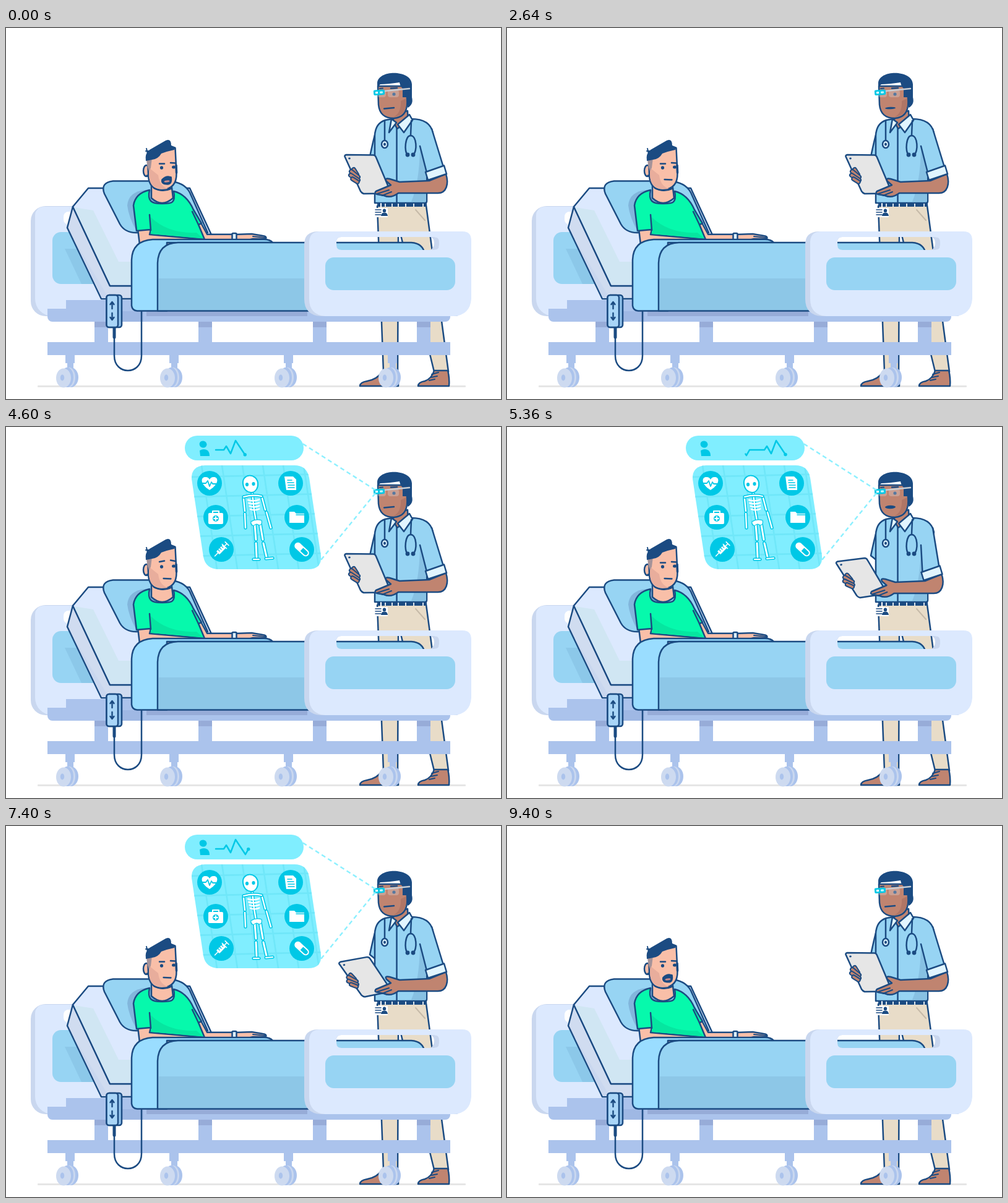
Write an HTML page with a canvas that moves like this. It is 800 px wide and 600 px high and loops after 9440 ms.

```html
<!DOCTYPE html>
<html lang="en">
<head>
<meta charset="utf-8">
<title>Bedside visit</title>
<style>
html, body { margin: 0; width: 100%; height: 100%; overflow: hidden; background: #fff; }
canvas { display: block; width: 800px; height: 600px; }
</style>
</head>
<body>
<canvas id="stage" width="800" height="600"></canvas>
<script>
const ctx = document.getElementById('stage').getContext('2d');
const LOOP = 9440, STEP = 40, TAU = Math.PI * 2;
const NAVY = '#1b4b82', BLUE = '#97d4f3', PALE = '#dce9fe', SHADE = '#c9d7ef', FRAME = '#abc3ec',
  FRAME_DARK = '#97acd8', SKIN = '#f9bfa8', SKIN_DARK = '#e8ad9c', BROWN = '#c08470', BEIGE = '#e8dcc8',
  GREEN = '#06f9ac', GREEN_DARK = '#06e6a0', AQUA = '#80eeff', CYAN = '#00c8e6';

const paths = new Map();
function shape(d, fill, stroke = NAVY, width = 2.5) {
  if (!paths.has(d)) paths.set(d, new Path2D(d));
  const p = paths.get(d);
  if (fill) { ctx.fillStyle = fill; ctx.fill(p, 'evenodd'); }
  if (stroke) { ctx.strokeStyle = stroke; ctx.lineWidth = width; ctx.stroke(p); }
}
const line = (d, width = 2.5, color = NAVY) => shape(d, null, color, width);
const flat = (d, fill) => shape(d, fill, null);
function box(x, y, w, h, r, fill, stroke) {
  ctx.beginPath();
  ctx.roundRect(x, y, w, h, r);
  paint(fill, stroke);
}
function oval(x, y, rx, ry, fill, stroke, angle = 0) {
  ctx.beginPath();
  ctx.ellipse(x, y, rx, ry, angle, 0, TAU);
  paint(fill, stroke);
}
function paint(fill, stroke) {
  if (fill) { ctx.fillStyle = fill; ctx.fill(); }
  if (stroke) { ctx.strokeStyle = stroke; ctx.lineWidth = 2.5; ctx.stroke(); }
}
function tube(d, width, fill, edge = NAVY, rim = 2.4) {
  line(d, width + rim * 2, edge);
  line(d, width, fill);
}
function group(draw) { ctx.save(); draw(); ctx.restore(); }
function turn(angle, x, y) { ctx.translate(x, y); ctx.rotate(angle); ctx.translate(-x, -y); }
function zoom(k, x, y) { ctx.translate(x, y); ctx.scale(k, k); ctx.translate(-x, -y); }

const lerp = (a, b, k) => a + (b - a) * k;
const clamp = k => Math.max(0, Math.min(1, k));
const ease = k => k * k * (3 - 2 * k);
// Eased value through time/value pairs
function key(t, ...k) {
  if (t <= k[0]) return k[1];
  for (let i = 2; i < k.length; i += 2)
    if (t < k[i]) return lerp(k[i - 1], k[i + 1], ease((t - k[i - 2]) / (k[i] - k[i - 2])));
  return k[k.length - 1];
}
const during = (t, a, b) => t >= a && t < b;

function headboard() {
  box(40, 288, 200, 178, 24, SHADE);
  box(47, 289, 200, 177, [14, 24, 24, 28], PALE);
  box(93, 297, 60, 21, 8, '#fff');
  box(75, 330, 120, 84, 14, BLUE);
  flat('M95 357 L116 357 L160 414 L122 414 Z', '#8cc8e9');
}

function doctorBody(t) {
  // legs and shoes
  shape('M600 288 L610 556 L633 556 L634 335 L638 335 L692 556 L715 556 L679 287 Z', BEIGE);
  shape('M572 579 Q572 573 584 571 Q600 568 607 557 L634 557 L634 579 Z', BROWN);
  shape('M666 579 Q666 573 677 571 Q688 567 692 554 L714 554 Q717 566 716 579 Z', BROWN);
  line('M688 560 L699 557 M687 565 L697 563 M684 570 L693 568', 2);
  line('M662 294 L677 311', 2, '#c6baa8');

  // far sleeve, neck and shirt
  shape('M600 160 Q596 170 588 208 L598 216 Z', BLUE);
  shape('M630 138 L649 134 L650 157 L633 166 L625 150 Z', BROWN);
  shape('M596 283 L596 174 Q597 154 613 149 L624 147 L632 163 L655 147 C676 147 687 155 690 170 L680 220 L680 280 Q680 283 677 283 Z', BLUE);
  flat('M669 195 L679 235 L679 281 L655 281 Q668 250 669 195 Z', '#87c1e3');
  line('M631.5 163 L631.5 283');
  shape('M623 147 L619 169 L631 153 Z', '#e1f5ff');
  shape('M633 156 L652 140 L657 149 L643 169 Z', '#e1f5ff');

  // stethoscope
  line('M612 150 L612 182');
  oval(612, 188, 5, 6, '#e1f5ff', NAVY);
  oval(612, 188, 2, 2.5, NAVY);
  line('M655 150 L654 173 M649 205 C643 200 645 174 654 174 C664 174 665 200 658 205');
  oval(649, 205, 3.4, 3.4, NAVY);
  oval(658, 205, 3.4, 3.4, NAVY);

  // belt and badge
  box(600, 283, 80, 6, 0, NAVY);
  for (const x of [612, 623, 633, 645, 658, 673]) box(x, 284, 2, 5, 0, '#dce5ec');
  box(596, 291, 21, 15, 1, '#fff');
  line('M597 294 H606 M597 298 H606 M597 302 H606', 1.6);
  oval(611.5, 295.5, 2.7, 3, NAVY);
  flat('M606 304 Q607 298 611.5 299 Q616 298 617 304 Z', NAVY);
  line('M606 284 L606 290', 2, '#fff');

  doctorHead(t);
}

function doctorHead(t) {
  flat('M648 96 L656 96 L656 112 Q659 124 649 129 Z', NAVY);
  shape('M601 94 L602 124 Q604 146 627 146 Q648 144 648 122 L648 94 Z', BROWN);
  flat('M638 118 L647 114 Q649 142 626 144 Q639 138 638 118 Z', '#b07666');
  flat('M600 96 V89 C601 67 655 67 656 91 V100 H648 V112 H641 V98 Q637 94 636 88 Q616 91 605 91 Z', NAVY);
  line('M622 97.5 L632 97', 2.5);
  line('M604 98 L609 97.5', 2);
  const blink = during(t, 2120, 2240) || during(t, 5480, 5600);
  oval(606, 106, 2.3, blink ? 0.7 : 2.3, NAVY);
  oval(627, 107, 2.6, blink ? 0.7 : 2.6, NAVY);
  box(617, 100, 18, 12, 4, 'rgba(225,225,230,.3)');
  box(600, 101, 14, 11, 4, 'rgba(225,225,230,.3)');
  line('M611 102 L652 98', 2.4, '#c9cdd3');
  group(() => {
    turn(-0.07, 603, 104);
    box(594, 100, 18, 8.5, 2, CYAN);
    box(597, 102.6, 4, 3.4, 1, '#fff');
    box(604, 102.6, 5, 3.4, 1, '#b8f6ff');
  });
  const talks = during(t, 2640, 3920) || during(t, 5000, 5960);
  const open = talks ? 0.5 + 0.5 * Math.cos((t - 3480) / 480 * TAU) : 0;
  if (open > 0.15) oval(619.5, 129.5, 8.5, 0.8 + 2 * open, NAVY, null, -0.04);
  else line('M611 130.5 L627 129', 2.4);
}

function doctorArm(t) {
  const lean = key(t, 2940, 0, 3280, 1, 3560, 1, 3880, 0, 5000, 0, 5320, 1, 5700, 1, 6040, 0);
  const tilt = key(t, 5100, 0, 5600, 15, 6200, 5.5, 6800, 11, 7400, 11, 8200, 0);
  const dx = -8.5 * lean, dy = 2 * lean;

  shape(`M688 163 L${707 + dx} ${225 + dy} L${680 + dx} ${233 + dy} L669 191 Z`, BLUE, null);
  line(`M688 163 L${707 + dx} ${225 + dy} M669 191 L${680 + dx} ${234 + dy}`);
  group(() => {
    ctx.translate(dx, dy);
    group(() => {
      turn(-tilt * Math.PI / 180, 622, 262);
      shape('M550 205 L594 205.5 Q597 206 598 209 L621 264 Q621 267 618 267.5 L578 268 Q575 267 573 264 L548 209 Q546 206 550 205 Z', '#e6e6e6');
      oval(555, 211, 1.8, 1.4, NAVY);
      tube('M562 229 L567 237', 4, BROWN, NAVY, 2);
      tube('M558 232 L569 241', 4, BROWN, NAVY, 2);
      tube('M557 238 L569 246', 4, BROWN, NAVY, 2);
      tube('M560 244 L568 249', 3.5, BROWN, NAVY, 2);
    });
    shape('M684 247 L636 249 L620 244 Q611 242 615 248 L622 254 L598 264 Q594 268 600 269 L611 271 Q622 276 634 267 L698 267 C712 267 716 252 711 236 Z', BROWN);
    line('M600 268 L619 262 M608 271 L623 265', 2);
    shape('M678 233 L708 222.5 L712 236 L682 246 Z', '#e1f5ff');
  });
}

function caster(x) {
  box(x + 15, 528, 15, 14, 0, FRAME);
  box(x + 18, 540, 10, 14, 0, FRAME);
  oval(x + 24, 565, 12, 16, FRAME);
  oval(x + 21, 565, 10, 16, SHADE);
  oval(x + 18, 565, 10, 16, FRAME);
  oval(x + 12, 566, 12, 15.5, '#cddaf0');
  oval(x + 10, 565.5, 3.2, 5, FRAME);
}

function bedFrame() {
  for (const x of [143, 311, 496, 664]) {
    box(x, 474, 22, 36, 0, FRAME);
    box(x, 474, 22, 10, 0, FRAME_DARK);
  }
  box(67, 454, 651, 21, [0, 0, 8, 8], FRAME);
  box(97, 440, 133, 20, 0, FRAME);
  box(176, 458, 46, 17, 0, '#9fb8e4');
  box(227, 457, 260, 9, 0, FRAME_DARK);
  box(67, 508, 651, 21, 0, FRAME);
  [81, 249, 434, 602].forEach(caster);
}

function mattress() {
  shape('M108 289 L99 323 L154 438 L230 438 L230 417 L168 417 Z', '#d0dcf0');
  flat('M100 322 L108 339 L166 437 L155 437 Z', SHADE);
  shape('M108 289 L133 259 L297 259 L335 341 L335 417 L168 417 Z', PALE);
  flat('M110 290 L141 295 L182 378 L204 378 L204 415 L169 415 Z', '#d0e6f3');
  shape('M173 247.5 L262 247.5 Q288 249 297 266 L326 331 L210 331 Q192 331 184 317 L159 268 Q152 250 173 247.5 Z', BLUE);
  flat('M211 329 Q198 305 196 287 Q198 264 226 262 L240 262 L240 329 Z', '#82b6dc');
}

function patientBody() {
  shape('M213 325 L216 350 L316 350 L312 330 Z', SKIN);
  shape('M235 250 L235 275 Q252 291 270 275 L267 250 Z', SKIN);
  shape('M232 262 Q209 267 206 287 L211 328 L234 326 L232 334 L321 342 L311 318 L316 316 L303 294 Q292 269 271 264 C275 285 266 284 251 284 C235 284 228 280 232 262 Z', GREEN);
  flat('M234 306 Q262 333 308 331 L318 340 L234 333 Z', GREEN_DARK);
  line('M232 302 L234 327 M301 297 L311 318');
}

function patientHead(t) {
  oval(227, 231, 5, 9, SKIN, NAVY);
  shape('M229 204 L230 240 Q232 262 252 262 Q276 260 275.5 235 L273.5 194 L262 190 Z', SKIN);
  flat('M231 226 L246 238 Q248 256 262 260 Q232 264 231 238 Z', SKIN_DARK);
  flat('M227 212 L236 210 L234 226 L231 232 L228 222 Z', '#a59399');
  flat('M226 215 Q224 203 232 197 L258 182 Q267 178 267 190 L274 193 L272 197 Q262 199 251 203 Q246 212 236 213 Z', NAVY);
  line('M227 195 L229 204 M226 199 L233 199', 2);
  line('M275 222 L275.5 234', 3.6);
  oval(228, 239, 1.8, 1.8, NAVY);
  line('M239 259 Q253 266 266 260', 2.5);

  const lift = key(t, 2960, 0, 3240, 1, 5000, 1, 5300, 0);
  const y = 219.5 - 2.5 * lift;
  line(`M248 ${y + lift} L256 ${y - lift * 0.6} M266 ${y - 1.5} L274 ${y - 1 + lift}`, 2.5);
  const blink = during(t, 640, 760) || during(t, 2400, 2520) || during(t, 5160, 5280);
  oval(251.5, 226, 2.6, blink ? 0.8 : 2.8, NAVY);
  oval(271, 225, 3, blink ? 0.8 : 2.5, NAVY);

  if (t < 2560 || t > 8840) {
    const talk = t > 8840 ? t - LOOP : t;
    const open = 0.5 + 0.5 * Math.cos(talk / 600 * TAU), low = 247 + 6 * open;
    shape(`M252 245 Q257 ${243 - 3 * open} 262 ${243 - 3 * open} L267 ${243 - 2 * open} Q269 ${low} 261 ${low} Q250 ${low} 252 245 Z`, NAVY, NAVY, 1.6);
    if (open > 0.55) oval(260, 248, 4.5, 1.6 * open, '#c98b8b', null, -0.1);
  } else line('M254.5 245 L266.5 245.5', 2.3);
}

function patientArm(t) {
  const up = key(t, 160, 0, 760, 1, 2040, 1, 2600, 0);
  const angle = -0.55 * up;
  const len = lerp(43, 53, up);
  const ex = 326, ey = lerp(341, 339, up);
  const wx = ex + len * Math.cos(angle), wy = ey + len * Math.sin(angle) - 2 * (1 - up);
  tube(`M304 306 L${ex - 4} ${ey - 2} L${wx} ${wy}`, lerp(8, 13, up), SKIN);
  group(() => {
    ctx.translate(wx, wy);
    if (up > 0.35) {
      ctx.rotate(angle + 0.55 + 0.14 * up * Math.sin((t - 1400) / 360 * Math.PI));
      tube('M18 -20 L29 -38', 4.5, SKIN, NAVY, 2.2);
      tube('M20 -18 L38 -36', 4.5, SKIN, NAVY, 2.2);
      tube('M22 -14 L39 -28', 4.5, SKIN, NAVY, 2.2);
      tube('M20 -10 L38 -20', 4.5, SKIN, NAVY, 2.2);
      shape('M-1 -12 Q2 -18 1 -27 Q5 -35 9 -26 L11 -19 L18 -25 L29 -17 Q30 -9 23 -3 Q16 3 9 3 Z', SKIN, null);
      line('M0 -10 Q3 -18 2 -27 Q5 -33 8 -27 L11 -17 M31 -14 Q27 -3 9 4 M11 -17 Q16 -15 16 -9', 2.3);
    } else {
      ctx.rotate(angle);
      shape('M0 -5 L28 -6 L46 -3 Q53 -2 51 2 L30 2 L16 6 L0 6 Z', SKIN);
      line('M30 -2 L50 0', 2);
    }
  });
  group(() => {
    ctx.translate(wx, wy);
    ctx.rotate(angle);
    const h = lerp(7, 11, up);
    box(-3.5, -h, 7, h * 2, 1.5, '#dff3ff', NAVY);
  });
  if (up > 0.9) ping(t, wx - 8, wy - 19);
}

function ping(t, x, y) {
  const p = ((t - 860) % 600 + 600) % 600 / 600;
  group(() => {
    ctx.globalAlpha = clamp(1.05 - p);
    ctx.strokeStyle = CYAN;
    ctx.lineWidth = 3.5;
    ctx.beginPath();
    ctx.arc(x, y, 8 + 23 * p, -2.42, -0.72);
    ctx.stroke();
  });
  oval(x, y, 4.5, 4.5, CYAN);
}

function blanket() {
  shape('M431 347 Q427 342 417 342 L237 342 Q204 344 203 375 L203 449 Q204 457 212 457.5 L260 457.5 L260 347 Z', '#9addff');
  shape('M245 457.5 L245 380 Q246 348 278 347 L655 347 Q674 348 677 366 L677 457.5 Z', BLUE);
  flat('M247 405 L675 405 L675 456 L247 456 Z', '#8dc7e7');
}

function footboard() {
  const slot = 'M542 338 H692 Q700 338 700 346 V351 Q700 359 692 359 H542 Q534 359 534 351 V346 Q534 338 542 338 Z';
  flat('M690 338 H692 Q700 338 700 346 V351 Q700 359 692 359 H686 Q692 355 692 348 Q692 340 686 338 Z', SHADE);
  flat('M503 329 H730 V466 H508 Q482 464 482 438 V350 Q482 330 503 329 Z ' + slot, SHADE);
  flat('M506 329 H738 Q752 329 752 344 V438 Q750 464 724 466 H516 Q490 464 490 438 V345 Q491 330 506 329 Z ' + slot, PALE);
  box(516, 371, 210, 53, 14, BLUE);
}

function remote() {
  line('M219 459 L219 530 C219 562 175 562 175 530 L175 495');
  line('M175 485 L175 500', 5);
  box(162.5, 432, 24.5, 52, 4, '#8fbfe8', NAVY);
  box(162.5, 432, 18.5, 52, 4, '#a9d5f7', NAVY);
  line('M171.5 454 L171.5 444 M168.5 447 L171.5 443 L174.5 447 M171.5 461 L171.5 471 M168.5 468 L171.5 472 L174.5 468', 2.4);
}

const icons = [
  [329, 91, () => {
    flat('M0 11 C-17 0 -14 -11 -6 -10 Q-2 -10 0 -6 Q2 -10 6 -10 C14 -11 17 0 0 11 Z', '#fff');
    line('M-13 0 H-6 L-3 -4 L0 5 L3 -2 L5 1 H13', 1.8, CYAN);
  }],
  [460, 91, () => {
    flat('M-10 -11 H4 L9 -6 V11 H-7 Z', '#fff');
    line('M-5 -5 H2 M-5 -1 H5 M-4 3 H6 M-4 7 H6', 1.6, CYAN);
  }],
  [339, 146, () => {
    line('M-5 -7 V-10 H5 V-7', 2, '#fff');
    box(-12, -7, 24, 18, 2, '#fff');
    oval(0, 2, 5, 5, CYAN);
    line('M-3 2 H3 M0 -1 V5', 1.8, '#fff');
  }],
  [470, 146, () => {
    flat('M-12 -9 H-4 L-1 -6 H12 V9 H-12 Z', '#fff');
    line('M-1 -4 H12', 1.3, CYAN);
  }],
  [348, 198, () => {
    ctx.rotate(-0.8);
    line('M-15 0 H-7 M8 0 H13 M13 -4 V4 M7 -5 V5', 1.6, '#fff');
    box(-8, -3.5, 15, 7, 1, '#fff');
    line('M-4 -4 V0 M0 -4 V0 M4 -4 V0', 1.3, CYAN);
  }],
  [478, 198, () => {
    ctx.rotate(0.75);
    box(-14, -5.5, 28, 11, 5.5, '#fff');
    box(0, -3.5, 12, 7, [0, 3.5, 3.5, 0], CYAN);
  }]
];

function skeleton() {
  const bone = (d, w) => tube(d, w, '#fff', CYAN, 1.5);
  bone('M384 116 L386 136', 2.4);
  bone('M386 140 L387 163', 2.4);
  bone('M414 115 L419 134', 2.4);
  bone('M421 138 L428 163', 2.4);
  bone('M402 158 L404 182', 3);
  bone('M404 188 L405 211', 3);
  bone('M411 158 L415 182', 3);
  bone('M416 188 L421 210', 3);
  bone('M400 214 H409 M420 213 L431 212', 2.2);
  bone('M398 108 L401 134 L404 152', 2.4);
  bone('M384 113 Q399 109 413 112', 2.2);
  for (let i = 0; i < 4; i++) {
    const y = 118 + i * 5, w = 9 - i * 0.6, x = 400 + i * 0.7;
    line(`M${x - w} ${y} Q${x} ${y + 3} ${x + w} ${y - 0.5}`, 2.4, '#fff');
  }
  shape('M396 153 Q404 148 413 151 Q415 158 409 159 Q404 155 400 160 Q395 158 396 153 Z', '#fff', CYAN, 1.2);
  shape('M383 92 C381 75 404 74 407 90 C408 100 402 106 396 106 C388 105 384 101 383 92 Z', '#fff', CYAN, 2);
  oval(389.5, 93, 2.6, 3, CYAN);
  oval(400, 92, 2.6, 3, CYAN);
}

const beat = [[0, 0], [13, 0], [17, -6], [24, 6], [32, -15], [48, 9], [53, 0], [64, 0]];
const pulse = [...beat, ...beat.slice(1).map(([x, y]) => [x + 64, y])].map(([x, y]) => [x + 339, y + 37]);

function heartTrace(from, to) {
  let run = 0, tip = null;
  ctx.beginPath();
  for (let i = 1; i < pulse.length; i++) {
    const [ax, ay] = pulse[i - 1], [bx, by] = pulse[i];
    const d = Math.hypot(bx - ax, by - ay);
    const a = clamp((from - run) / d), b = clamp((to - run) / d);
    if (b > a) {
      if (!tip) ctx.moveTo(lerp(ax, bx, a), lerp(ay, by, a));
      tip = [lerp(ax, bx, b), lerp(ay, by, b)];
      ctx.lineTo(...tip);
    }
    run += d;
  }
  paint(null, CYAN);
  if (tip && to < run) oval(...tip, 2.7, 2.7, CYAN);
}

const PANEL = 'M322 62 H466 Q486 62 490 82 L509 208 Q511 230 488 230 H344 Q323 230 319 210 L300 84 Q299 63 322 62 Z';

function hologram(t) {
  const beam = key(t, 2920, 0, 3280, 1, 9040, 1, 9280, 0);
  if (beam <= 0) return;
  group(() => {
    ctx.setLineDash([7, 5]);
    ctx.lineCap = 'butt';
    line(`M597 102 L${lerp(597, 478, beam)} ${lerp(102, 26, beam)} M597 107 L${lerp(597, 505, beam)} ${lerp(107, 220, beam)}`, 2.4, '#8cf0ff');
  });
  const wide = key(t, 3240, 0, 3660, 1, 8840, 1, 9120, 0);
  const size = key(t, 3200, 0, 3640, 1, 8840, 1, 9120, 0);
  const detail = key(t, 3640, 0, 3880, 1, 8680, 1, 8840, 0);

  if (wide > 0) {
    const w = 192 * wide;
    box(385 - w / 2, 14, w, 40, Math.min(20, w / 2), AQUA);
  }
  if (size > 0) group(() => {
    zoom(size, 404.5, 146);
    ctx.globalAlpha = size;
    flat(PANEL, AQUA);
  });
  if (detail <= 0) return;
  group(() => {
    ctx.globalAlpha = detail;
    oval(318.5, 28, 6, 5.5, CYAN, null, 0.3);
    flat('M313 38 Q320 34 326 38 Q329 41 329 47 H314 Z', CYAN);
    group(() => {
      ctx.clip(new Path2D(PANEL));
      for (let i = 0; i < 6; i++) line(`M${316 + i * 33} 62 L${341 + i * 33} 230`, 2.6, '#70e7f9');
      for (let i = 0; i < 5; i++) line(`M295 ${81 + i * 32} L515 ${76 + i * 32}`, 2.6, '#70e7f9');
    });
    skeleton();
  });
  icons.forEach(([x, y, glyph], i) => group(() => {
    const k = key(t, 3680 + i * 60, 0, 3920 + i * 60, 1) * detail;
    if (k <= 0) return;
    ctx.translate(x, y);
    ctx.scale(k, k);
    oval(0, 0, 20, 20, CYAN);
    glyph();
  }));
  group(() => {
    ctx.globalAlpha = detail;
    for (const start of [4000, 6720])
      if (t > start && t < start + 2320) heartTrace((t - start - 770) * 0.14, (t - start) * 0.14);
  });
}

function draw(t) {
  ctx.fillStyle = '#fff';
  ctx.fillRect(0, 0, 800, 600);
  ctx.lineCap = ctx.lineJoin = 'round';
  box(51, 578, 692, 3, 1, '#e6e6e6');
  headboard();
  doctorBody(t);
  doctorArm(t);
  bedFrame();
  mattress();
  patientArm(t);
  patientBody();
  patientHead(t);
  blanket();
  footboard();
  remote();
  hologram(t);
}

const begin = performance.now();
function tick() {
  const t = (performance.now() - begin) % LOOP;
  draw(Math.floor(t / STEP) * STEP);
  requestAnimationFrame(tick);
}
tick();
</script>
</body>
</html>
```
